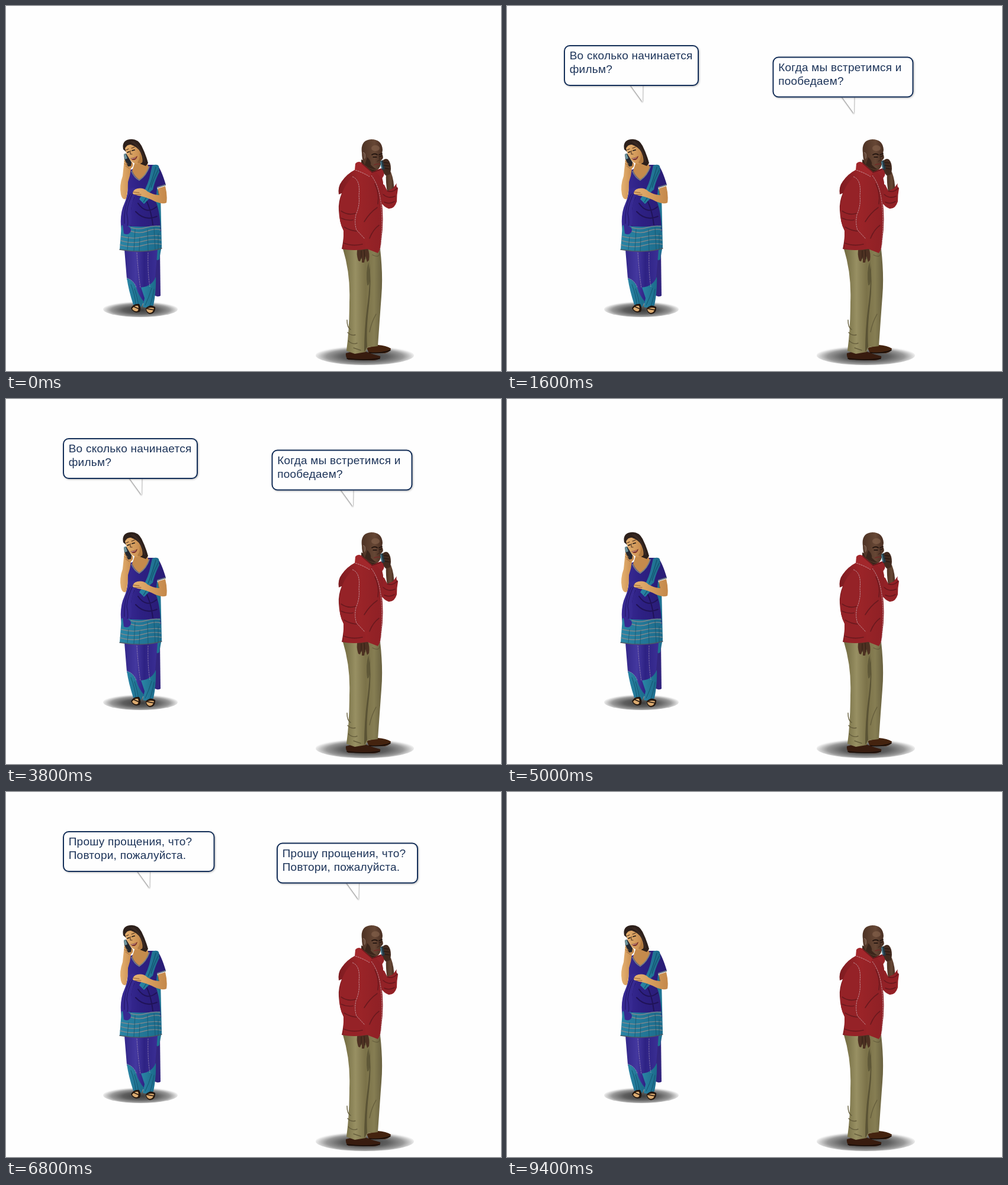
These frames come from a looping animation (836 by 616 pixels, 9600 ms). An HTML page:

```html
<!DOCTYPE html>
<html lang="ru">
<head>
<meta charset="utf-8">
<title>Phone talk</title>
<style>
html, body { margin: 0; width: 100%; height: 100%; overflow: hidden; background: #fefefe; }
svg { display: block; }
text { font: 19px "Liberation Sans", Arial, sans-serif; letter-spacing: .25px; fill: #1d3459; }
.tail { fill: #fefefe; filter: drop-shadow(.5px 1px 1.3px rgba(0,0,0,.65)); }
.box { fill: #fefefe; stroke: #142f59; stroke-width: 2; filter: drop-shadow(1.5px 1.5px 1.5px rgba(0,0,0,.28)); }
.line { fill: none; stroke-linecap: round; stroke-linejoin: round; }
.seam { fill: none; stroke: #d0bcc4; stroke-width: .7; stroke-dasharray: 3 1; }
</style>
</head>
<body>
<svg width="836" height="616" viewBox="0 0 836 616">
<defs>
  <radialGradient id="shade" cy=".56" fy=".56" r=".52">
    <stop offset="0" stop-color="#3c3c3c"/><stop offset=".45" stop-color="#5e5e5e"/>
    <stop offset=".75" stop-color="#989898"/><stop offset="1" stop-color="#fafafa"/>
  </radialGradient>
  <linearGradient id="skin">
    <stop offset="0" stop-color="#e6b272"/><stop offset="1" stop-color="#c4884a"/>
  </linearGradient>
  <linearGradient id="violet">
    <stop offset="0" stop-color="#3b2d98"/><stop offset=".45" stop-color="#2d2083"/><stop offset="1" stop-color="#291c74"/>
  </linearGradient>
  <linearGradient id="pants">
    <stop offset="0" stop-color="#33278a"/><stop offset=".35" stop-color="#44389f"/>
    <stop offset=".6" stop-color="#2e2284"/><stop offset="1" stop-color="#3b2f95"/>
  </linearGradient>
  <linearGradient id="teal">
    <stop offset="0" stop-color="#2a85a5"/><stop offset="1" stop-color="#1c6b8b"/>
  </linearGradient>
  <linearGradient id="red">
    <stop offset="0" stop-color="#7d1b20"/><stop offset=".45" stop-color="#9b2428"/><stop offset="1" stop-color="#8e2025"/>
  </linearGradient>
  <linearGradient id="khaki">
    <stop offset="0" stop-color="#6f683f"/><stop offset=".32" stop-color="#989063"/>
    <stop offset=".58" stop-color="#7b7249"/><stop offset=".8" stop-color="#867e53"/><stop offset="1" stop-color="#696140"/>
  </linearGradient>
  <linearGradient id="brown">
    <stop offset="0" stop-color="#4d3224"/><stop offset=".6" stop-color="#664735"/><stop offset="1" stop-color="#462c20"/>
  </linearGradient>
</defs>

<g id="woman">
  <ellipse cx="227" cy="511.5" rx="63" ry="13.5" fill="url(#shade)"/>
  <path d="M252 300L261 320L263 405L258 432L253 415Z" fill="#1f7393"/>
  <path d="M253 414L260 414L261 489Q256 492 250 488Z" fill="#33267f"/>
  <path d="M254 414L260 414L259 427Q255 432 253 425Z" fill="#1f7393"/>
  <path d="M200 411L256 411L251 470Q250 490 247 503L235 508L231 499L227 507L215 504Q211 480 204 460Z" fill="url(#pants)"/>
  <path d="M204 459Q216 463 220 475Q224 489 233 499L228 508L215 504Q207 480 204 459Z" fill="url(#teal)"/>
  <path d="M253 457Q247 473 228 475L234 493L231 508Q242 511 249 505Q254 480 253 457Z" fill="url(#teal)"/>
  <path class="line" d="M211 470Q218 488 219 503M217 477Q222 492 224 505M246 476Q241 493 235 505M250 478Q247 495 243 506" stroke="#14566f"/>
  <path class="seam" opacity=".7" d="M221 416Q223 450 227 476M240 416Q239 450 243 474M204 459Q216 463 220 475"/>
  <path d="M211 510Q216 501 225 503Q229 510 226 516Q216 520 211 510ZM236 510Q244 502 252 508Q253 519 243 520Q236 518 236 510Z" fill="#24170f"/>
  <path d="M213 511Q217 505 223 506Q225 512 222 515Q216 516 213 511ZM237 512Q242 507 250 510Q249 517 243 518Q238 517 237 512Z" fill="#dcab70"/>
  <path class="line" d="M215 507L224 511M239 511L250 513" stroke="#24170f" stroke-width="1.5"/>

  <path d="M209 277L222 272L240 268L255 268Q262 275 270 302L255 307L253 330Q259 342 261 373L262 380L195 380Q191 352 200 333Q207 318 205 304Q203 290 209 277Z" fill="url(#violet)"/>
  <path d="M216 323Q206 342 211 378M223 333Q237 353 254 339M219 347Q235 364 255 355M232 320Q244 337 248 369" class="line" stroke="#201358" stroke-width="2"/>
  <path d="M207 309Q217 303 221 311Q214 327 211 343Q214 365 208 380L197 371Q192 350 201 333Z" fill="#372a92"/>
  <path class="line" d="M216 312Q205 332 204 350Q208 367 203 380M210 317Q199 337 200 367" stroke="#271a70" stroke-width="1.4"/>
  <path d="M195 370Q230 375 260 370L263 409Q230 418 192 411Z" fill="url(#teal)"/>
  <path d="M197 369Q212 371 211 380Q207 388 199 384Z" fill="#372a92"/>
  <g class="line" stroke="#7b888e" stroke-width="1.4">
    <path d="M211 374Q224 378 236 374T260 372M211 380Q225 385 238 380T261 378M195 389Q215 394 230 390T261 388M194 396Q215 402 231 397T262 395M193 403Q215 409 231 404T262 402"/>
    <path d="M192 411Q230 418 263 409" stroke="#4e5a63"/>
  </g>
  <path class="line" d="M207 389L205 411M218 377L216 413M226 391L225 414M239 377L240 414M250 374L252 411M257 384L257 411" stroke="#17526a" opacity=".75"/>
  <path d="M247 269Q255 266 258 270L259 280Q251 296 248 310Q237 317 242 325L233 334L225 326Q237 309 242 291Z" fill="url(#teal)"/>
  <path class="line" d="M253 272Q247 294 240 311M257 277Q248 294 245 306M238 322L232 331" stroke="#14556f" stroke-width="1.3"/>
  <path class="line" d="M256 306L269 302" stroke="#6f7b86" stroke-width="2.2"/>

  <path d="M219 260L237 262L241 272Q236 287 225 293Q217 288 213 278Z" fill="#c58b4c"/>
  <path class="line" d="M212 279Q217 290 225 294Q237 286 242 271" stroke="#778184" stroke-width="1.8"/>
  <path d="M256 308L269 304Q273 320 271 332Q262 336 246 327Q232 321 223 320L214 317Q214 310 222 308Q232 306 239 313Q249 319 259 319Z" fill="url(#skin)"/>
  <path class="line" d="M215 314L225 315M218 318L228 318M258 319L257 311" stroke="#8d5e33"/>
  <path d="M198 242Q195 227 209 225Q222 223 229 236Q236 250 240 265L236 270L226 266Z" fill="#2d201b"/>
  <path class="line" d="M215 229Q230 239 234 263M212 229Q225 236 230 255" stroke="#4d382f" stroke-width=".8"/>
  <path d="M201 240Q205 233 211 234Q223 238 227 247Q232 259 230 264Q224 269 216 265Q205 259 201 240Z" fill="url(#skin)"/>
  <path d="M225 246Q231 258 230 264Q225 267 222 264Q228 256 225 246Z" fill="#b07a40"/>
  <path class="line" d="M203 243L207 241M212 240L217 238M210 244L210 250L213 250" stroke="#51331f" stroke-width="1.1"/>
  <path class="line" d="M205 247L208 246M213 244L217 243" stroke="#1d1715" stroke-width="1.8"/>
  <path d="M210 257Q216 257 222 253Q220 261 214 260Z" fill="#7a2e29"/>
  <path class="line" d="M212 257.5Q216 258 219 256" stroke="#e6d0c0" stroke-width=".8"/>
  <path d="M200 258Q205 256 209 260L214 265Q216 271 211 274Q210 286 206 297Q206 313 203 325Q197 329 194 318Q191 303 197 287Z" fill="url(#skin)"/>
  <path d="M199 250L203 249L212 264L211 270L206 271L200 258Z" fill="#24272e"/>
  <path d="M199 250L202 249L205 257L201 259Z" fill="#6c959e"/>
  <path class="line" d="M200 262L206 267M200 266L206 270M202 270L208 274" stroke="#966337" stroke-width=".9"/>
</g>

<g id="man">
  <ellipse cx="606" cy="589.5" rx="83" ry="16.5" fill="url(#shade)"/>
  <path d="M609 577L628 572Q642 573 650 578Q650 583 640 586L613 586Z" fill="#44230f"/>
  <path d="M574 586Q590 581 607 583Q620 588 632 591Q634 597 620 598L578 597Q573 593 574 586Z" fill="#381c0f"/>
  <path class="line" d="M576 595Q603 599 631 595M614 585Q634 587 649 581" stroke="#160d09" stroke-width="1.5"/>
  <path d="M569 410L632 410Q637 455 634 490Q631 530 628 574L611 576L607 584L589 587L575 582Q580 545 580 500Q582 452 569 410Z" fill="url(#khaki)"/>
  <path d="M613 424Q618 465 613 505Q608 545 610 575L605 584Q605 540 611 500Q616 460 613 424Z" fill="#5a5335"/>
  <path d="M612 432Q607 450 610 471Q614 474 615 453Z" fill="#5f5838"/>
  <path class="line" d="M619 420Q630 426 631 417M576 530Q576 543 582 546M577 551Q583 557 590 555M578 565Q585 572 593 569M587 577L599 581M625 520Q617 534 614 550" stroke="#665e3d" stroke-width="1.4"/>
  <path d="M594 408L610 405Q615 418 613 429L610 432L607 422L605 433L601 433L601 423L598 431L595 430Q591 418 594 408Z" fill="#4d3122"/>
  <path class="line" d="M600 413L600 426M605 412L606 427" stroke="#301e15"/>

  <path d="M642 282L650 280Q656 296 655 311L644 315Q641 297 642 282Z" fill="url(#brown)"/>
  <path d="M634 299L639 302L644 312L653 308L660 299Q658 304 662 308Q660 318 660 330Q656 343 646 342Q638 339 632 330Z" fill="#932126"/>
  <path class="line" d="M644 312Q653 316 661 307M637 318Q646 326 657 321M639 331Q648 335 656 330" stroke="#68181d" stroke-width="1.6"/>
  <path d="M600 259L630 271L625 284L618 288L600 271Z" fill="#3c261b"/>
  <path d="M590 267Q594 261 601 265L618 280L633 275Q639 282 635 289Q640 304 634 325Q639 360 634 395Q633 411 628 417L610 410Q588 414 567 410Q571 390 570 379Q563 365 562 345Q561 330 567 316L562 318Q560 305 567 296Q576 283 590 276Z" fill="url(#red)"/>
  <path d="M590 266Q594 261 600 264L618 280L614 288Q600 282 589 277Z" fill="#a2272b"/>
  <path d="M625 277L636 273Q642 283 635 291L627 283Z" fill="#962328"/>
  <path d="M586 288Q599 291 596 319Q599 335 591 352Q588 367 593 379L607 399L606 409Q588 414 570 409L570 379Q562 365 563 342Q564 308 586 288Z" fill="#952227"/>
  <path class="line" d="M566 346Q578 354 590 350M566 358Q576 363 586 361M571 373Q581 379 592 380M570 400Q585 406 602 402M627 340Q614 349 605 364M630 370Q620 377 614 392M623 300Q631 316 628 334" stroke="#6b191e" stroke-width="1.6"/>
  <path class="seam" d="M585 288Q599 293 596 320Q598 336 591 352Q588 367 592 378L606 393M617 286Q629 301 633 330Q637 365 632 414M590 277Q603 281 614 288"/>
  <path class="line" d="M601 266L618 281L633 276" stroke="#581217"/>

  <path d="M601 248Q598 226 617 225Q635 225 636 243L635 249Q638 255 636 258L633 261L633 267Q631 276 625 277Q611 275 606 268Q601 260 601 248Z" fill="url(#brown)"/>
  <ellipse cx="624" cy="240" rx="7" ry="5" fill="#82604a" opacity=".7"/>
  <path d="M610 255Q617 261 616 268Q622 274 627 276Q614 276 606 268Z" fill="#3a251b"/>
  <path class="line" d="M618 251Q623 248 627 251M630 251L635 249" stroke="#21140f" stroke-width="1.8"/>
  <path class="line" d="M620 255L626 255M631 254L634 253" stroke="#170e0b" stroke-width="1.3"/>
  <path class="line" d="M630 253L631 260L627 262" stroke="#39231b"/>
  <path class="line" d="M622 268Q628 266 631 267" stroke="#702f2a" stroke-width="2"/>
  <path d="M602 248Q608 246 607 255Q606 260 604 258Z" fill="#664939"/>
  <path class="line" d="M603 247Q608 247 606 257" stroke="#a08a7b" stroke-width=".7"/>
  <path d="M635 262Q640 256 645 259Q650 264 650 275L649 284L641 286Q634 278 635 262Z" fill="#422a1f"/>
  <path d="M632 262L636 260L640 275L635 277Z" fill="#253842"/>
  <path d="M632 263L634 262L636 274L634 275Z" fill="#467588"/>
  <path class="line" d="M638 264L646 265M638 269L647 270M640 274L647 275" stroke="#21140f" stroke-width="1.2"/>
</g>
<g id="talk"></g>
</svg>
<script>
const NS = "http://www.w3.org/2000/svg";
const LOOP = 9600;
const talk = document.getElementById("talk");

function add(parent, tag, attrs, content) {
  const el = document.createElementNS(NS, tag);
  for (const key in attrs) el.setAttribute(key, attrs[key]);
  if (content) el.textContent = content;
  return parent.appendChild(el);
}

function bubble(parent, x, y, width, tip, lines) {
  const base = y + 67;
  add(parent, "path", {
    class: "tail",
    d: `M${tip - 21} ${base - 1}H${tip + .5}L${tip} ${base + 28}Z`
  });
  add(parent, "rect", { class: "box", x, y, width, height: 67, rx: 9 });
  lines.forEach((line, i) =>
    add(parent, "text", { x: x + 8.7, y: y + 23 + 23 * i }, line));
}

function scene(from, to, left, right) {
  const group = add(talk, "g", { visibility: "hidden" });
  bubble(group, ...left);
  bubble(group, ...right);
  return { from, to, group };
}

const sorry = ["Прошу прощения, что?", "Повтори, пожалуйста."];
const scenes = [
  scene(200, 4200,
    [97, 67, 226, 229, ["Во сколько начинается", "фильм?"]],
    [449.5, 86.5, 236, 586, ["Когда мы встретимся и", "пообедаем?"]]),
  scene(5800, 9400,
    [97, 67, 254.5, 242.5, sorry],
    [458, 86.5, 237, 595.5, sorry])
];

function draw(now) {
  const t = now % LOOP;
  for (const s of scenes)
    s.group.setAttribute("visibility", t >= s.from && t < s.to ? "visible" : "hidden");
}

const start = performance.now();
function tick() {
  draw(performance.now() - start);
  requestAnimationFrame(tick);
}
tick();
</script>
</body>
</html>
```
